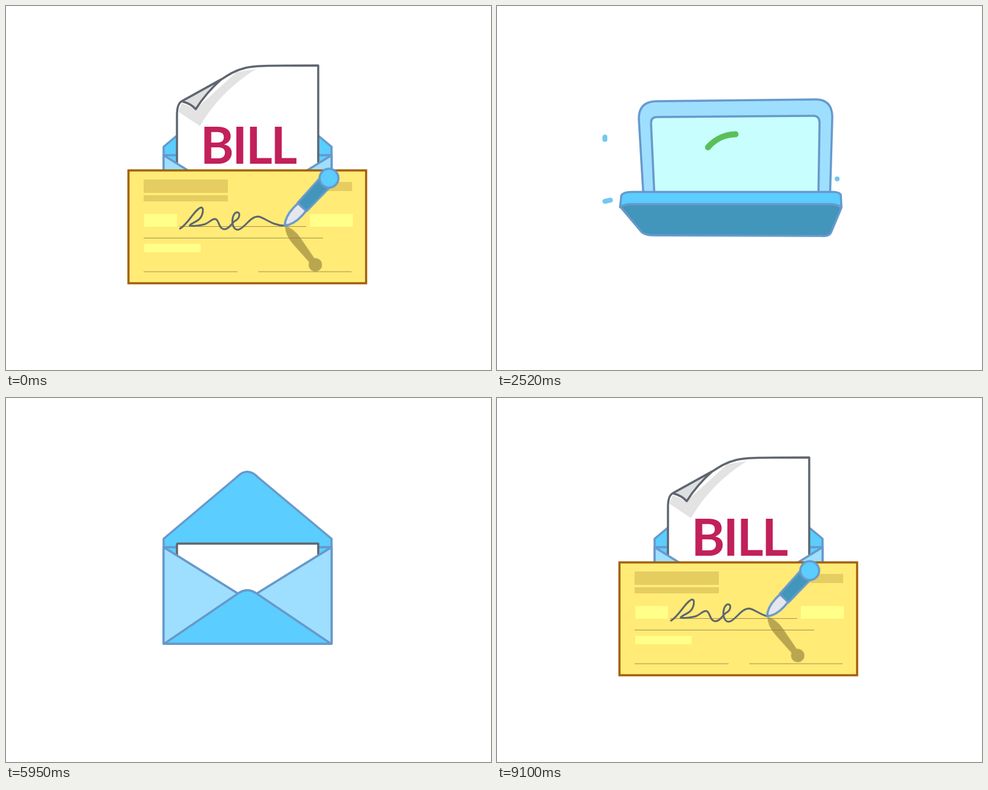
An HTML page without scripts that plays this animation: 800x600 px, repeating every 9.17 s.

```html
<!DOCTYPE html>
<html lang="en">
<head>
<meta charset="utf-8">
<title>Paying a bill by mail</title>
<style>
html, body { margin: 0; width: 100%; height: 100%; overflow: hidden; background: #fff; }
svg { position: absolute; left: 0; top: 0; width: 800px; height: 600px; }
svg * { animation: 9.17s linear infinite; }
.line { stroke: #6799cb; stroke-width: 3.5; stroke-linejoin: round; stroke-linecap: round; }
.sky { fill: #5bcdff; }
.pale { fill: #9edfff; }
.deep { fill: #4295bb; }

/* envelope */
#mail { transform-origin: 398px 325px; animation: turn 9.17s linear infinite; }
@keyframes turn {
  0%, 22.14%, 54.96%, to { transform: perspective(1400px) translate(0, 0) rotateX(0) rotateY(0) scale(1); }
  22.14% { animation-timing-function: ease-in; }
  25.19% { transform: perspective(1400px) translate(0, 0) rotateX(90deg) rotateY(0) scale(1.1); }
  48.09% { transform: perspective(1400px) translate(0, 0) rotateX(90deg) rotateY(18deg) scale(1.1); animation-timing-function: ease-out; }
  51.15% { transform: perspective(1400px) translate(-3px, -1px) rotateX(0) rotateY(18deg) scale(1.04); }
}
.flap { transform-origin: 398px 246px; }
#open { animation-name: open; }
#shut { animation-name: shut; }
@keyframes open {
  0%, 18.3%, 64.89%, to { transform: scaleY(1); }
  20%, 63.2% { transform: scaleY(0); }
}
@keyframes shut {
  0%, 20%, 63.2%, to { transform: scaleY(0); }
  21.37%, 61.83% { transform: scaleY(1); }
}
#cover { animation-name: cover; }
@keyframes cover {
  0%, 11.1%, 72.2%, to { visibility: hidden; }
  11.11%, 72.19% { visibility: visible; }
}

/* bill */
#bill { animation-name: bill; }
@keyframes bill {
  0%, 12.4% { transform: translateY(0); }
  13.5% { transform: translateY(-14px); animation-timing-function: ease-in; }
  15.27% { transform: translateY(50px); }
  17.56% { transform: translateY(170px); }
  64.5% { transform: translateY(170px); animation-timing-function: ease-out; }
  68.7% { transform: translateY(-14px); animation-timing-function: ease-in-out; }
  70.23%, to { transform: translateY(0); }
}
.curl { animation-name: curl; d: var(--a); }
@keyframes curl {
  0%, 11.4%, 72.5%, to { d: var(--a); }
  13%, 70.23% { d: var(--b); }
}
.ink { stroke: #5f666f; stroke-width: 3.5; stroke-linejoin: round; }
#sheet {
  --a: path("M515 98 C440 98 410 98 395 102 C375 107 365 115 355 121 L290 157 C284 160 282 168 282 180 L282 410 L515 410 Z");
  --b: path("M515 148 C440 148 400 148 380 148 C360 148 340 148 330 148 L284 148 C282 148 282 148 282 150 L282 410 L515 410 Z");
  --b: path("M515 98 C440 98 400 98 380 98 C360 98 340 98 330 98 L284 98 C282 98 282 98 282 100 L282 410 L515 410 Z");
}
#shade {
  --a: path("M284 174 L320 198 Q352 142 412 104 L380 109 L313 170 L290 160 Z");
  --b: path("M283 99 L283 99 Q283 99 283 99 L283 99 L283 99 L283 99 Z");
}
#fold {
  --a: path("M290 157 Q305 161 313 170 Q330 143 355 121 Z");
  --b: path("M282 98 Q282 98 282 98 Q282 98 282 98 Z");
}
#word { font: 700 84px Lato, "Open Sans", sans-serif; letter-spacing: -2.5px; fill: #c2205a; }

/* cheque */
#cheque { transform-origin: 398px 271px; animation-name: cheque; }
@keyframes cheque {
  0%, 3.82% { transform: translateY(0) scale(1); animation-timing-function: ease-in-out; }
  10.69% { transform: translateY(-165px) scale(.52); }
  12.98% { transform: translateY(-150px) scale(.52); animation-timing-function: ease-in; }
  15.27% { transform: translateY(-19px) scale(.52); animation-timing-function: ease-out; }
  17.56%, 22.9% { transform: translateY(29px) scale(.52); }
  22.91% { transform: translateY(340px) scale(1); }
  72.3% { transform: translateY(340px) scale(1); animation-timing-function: cubic-bezier(.25, .46, .45, .94); }
  77.6%, to { transform: translateY(0) scale(1); }
}

/* signature and pen share one path and one pace */
:root {
  --sign: path("M287 367 C300 360 312 334 322 332 C327 333 325 346 318 352 C312 357 304 359 303 362 C308 363 320 362 327 360 C335 358 338 351 345 351 C352 352 350 367 360 368 C368 368 372 358 378 354 C386 350 387 340 381 340 C375 341 372 352 374 360 C376 368 381 371 387 367 C397 361 404 347 416 347 C426 348 438 362 460 362 C469 362 477 360 483 357");
}
#sign { d: var(--sign); fill: none; stroke: #5f666f; stroke-width: 3; stroke-linecap: round; stroke-linejoin: round; stroke-dasharray: 100 200; }
#tip { offset-path: var(--sign); offset-rotate: 0deg; }
#sign, #tip { animation-name: write; }
@keyframes write {
  0% { stroke-dashoffset: 6.9; offset-distance: 93.1%; }
  1.2%, 22% { stroke-dashoffset: 0; offset-distance: 100%; }
  22.01%, 82.44% { stroke-dashoffset: 101; offset-distance: 0%; }
  88.55% { stroke-dashoffset: 64; offset-distance: 36%; }
  99.24% { stroke-dashoffset: 11; offset-distance: 89%; }
  to { stroke-dashoffset: 6.9; offset-distance: 93.1%; }
}
#fly { animation-name: fly; }
@keyframes fly {
  0%, 1.2% { transform: translate(0, 0); animation-timing-function: ease-in; }
  4.2%, 22.1% { transform: translate(345px, -240px); }
  22.11%, 78.5% { transform: translate(-345px, 0); animation-timing-function: ease-out; }
  82.44%, to { transform: translate(0, 0); }
}
#pen { animation-name: lean; }
@keyframes lean {
  0%, 99.24%, to { transform: rotate(43deg); }
  1.2%, 25% { transform: rotate(46deg); }
  25.01%, 82.44% { transform: rotate(-58deg); }
  88.55% { transform: rotate(-42deg); }
}
#body { animation-name: reach; }
@keyframes reach {
  0%, 25%, to { transform: scaleY(1); }
  25.01%, 82.44% { transform: scaleY(.9); }
  88.55% { transform: scaleY(.76); }
  99.24% { transform: scaleY(.97); }
}
#cap { animation-name: cap; }
@keyframes cap {
  0%, 25%, to { transform: translateY(-107px); }
  25.01%, 82.44% { transform: translateY(-95px); }
  88.55% { transform: translateY(-81px); }
  99.24% { transform: translateY(-103px); }
}
#cast { fill: #8f7a35; animation-name: cast; }
@keyframes cast {
  0%, 1.2% { transform: rotate(-38deg); opacity: .62; }
  2.6%, 25% { transform: rotate(-38deg); opacity: 0; }
  25.01%, 82.44% { transform: rotate(14deg); opacity: .62; }
  88.55% { transform: rotate(-5deg); opacity: .62; }
  99.24%, to { transform: rotate(-38deg); opacity: .62; }
}

/* laptop */
#laptop { transform-origin: 397px 310px; animation-name: pop; }
@keyframes pop {
  0%, 25.19% { transform: scale(.75, 0); animation-timing-function: ease-out; }
  27.48% { transform: scale(1); }
  30.53% { transform: scale(1.04); animation-timing-function: ease-in-out; }
  33.59%, 43.51% { transform: scale(1); animation-timing-function: ease-in-out; }
  45.5% { transform: scale(1.08, 1); animation-timing-function: ease-in; }
  48.09%, to { transform: scale(.8, 0); }
}
.tilt { animation-name: tilt; d: var(--a); }
@keyframes tilt {
  0%, 27.48% { d: var(--a); animation-timing-function: ease-out; }
  32%, 45% { d: var(--b); }
  48.09%, to { d: var(--a); }
}
#lid {
  --a: path("M242 320 L234 187 Q233 158 262 157 L526 154 Q552 154 553 182 L549 320 Z");
  --b: path("M238 348 L238 172 Q238 147 262 147 L534 147 Q558 147 558 172 L558 348 Z");
}
#screen {
  --a: path("M260 320 L254 193 Q254 183 264 183 L522 181 Q531 181 532 191 L530 320 Z");
  --b: path("M260 332 L260 180 Q260 169 271 169 L525 169 Q536 169 536 180 L536 332 Z");
}
#under {
  --a: path("M203 330 Q210 326 222 326 L548 326 Q560 326 568 332 L551 373 Q548 380 536 379 L258 378 Q246 378 239 373 Z");
  --b: path("M230 452 Q236 450 240 450 L550 450 Q560 450 566 452 L556 400 Q550 396 540 396 L258 396 Q248 396 242 400 Z");
}
#deck {
  --a: path("M212 312 L560 312 L560 320 L212 320 Z");
  --b: path("M238 346 L558 346 L581 442 L215 442 Z");
}
#front {
  --a: path("M205 312 Q208 306 222 306 L556 306 Q567 307 567 312 L568 331 Q560 326 548 326 L222 326 Q210 326 203 331 Z");
  --b: path("M214 440 Q216 436 226 436 L570 436 Q580 436 582 440 L582 452 Q578 459 566 459 L230 459 Q216 459 214 452 Z");
}
#tick { fill: none; stroke: #5abf5a; stroke-width: 10; stroke-linecap: round; stroke-linejoin: round; animation-name: settle; }
#tick path { stroke-dasharray: 100 200; }
@keyframes settle {
  0%, 27.48% { transform: translate(391px, 276px); animation-timing-function: ease-out; }
  32%, to { transform: translate(398px, 250px); }
}
#ring { animation-name: ring; }
@keyframes ring {
  0%, 26.9% { stroke-dashoffset: 103; }
  27.48% { stroke-dashoffset: 87.5; }
  30.53%, 49% { stroke-dashoffset: 0; }
  50%, to { stroke-dashoffset: 103; }
}
#mark { animation-name: mark; }
@keyframes mark {
  0%, 30% { stroke-dashoffset: 110; }
  32%, 49% { stroke-dashoffset: 0; }
  50%, to { stroke-dashoffset: 110; }
}
.spark { fill: none; stroke: #72c8f0; stroke-width: 8; stroke-linecap: round; animation-name: spark; }
@keyframes spark {
  0%, 26% { transform: translate(var(--x), var(--y)); opacity: 0; }
  26.01% { transform: translate(var(--x), var(--y)); opacity: 1; animation-timing-function: ease-out; }
  27.48%, 28.6% { transform: translate(0, 0); opacity: 1; }
  28.61%, to { transform: translate(0, 0); opacity: 0; }
}
</style>
</head>
<body>
<svg id="mail" viewBox="0 0 800 600">
  <defs>
    <clipPath id="inside"><path d="M0 0H800V403H0Z"/></clipPath>
    <g id="pocket" class="line">
      <path class="pale" d="M260 246L398 332L537 246V405H260Z"/>
      <path class="sky" d="M261 405L383 322Q398 312 413 322L536 405Z"/>
    </g>
  </defs>

  <path id="open" class="flap sky line" d="M260 246V232L380 131Q398 112 416 131L537 232V246Z"/>
  <path class="sky line" d="M260 246H537V405H260Z"/>

  <g clip-path="url(#inside)">
    <g id="bill">
      <path id="sheet" class="curl ink" fill="#fff"/>
      <path id="shade" class="curl" fill="#e4e3e3"/>
      <path id="fold" class="curl ink" fill="#dddfe0"/>
      <text id="word" x="320.5" y="260">BILL</text>
    </g>
  </g>

  <use href="#pocket"/>

  <g id="cheque">
    <path d="M202 271H594V457H202Z" fill="#ffeb76" stroke="#a2600c" stroke-width="3.5"/>
    <path d="M227 286h139v22h-139zM227 312h139v10h-139zM517 290h54v15h-54z" fill="#e5cd62"/>
    <path d="M228 343h54v21h-54zM501 343h71v21h-71zM228 392h93v14h-93z" fill="#ffff89"/>
    <path d="M286 363.5H495M227 382.5H523M227 438H382M416 438H570" stroke="#a58d50" stroke-width="1.2"/>
    <path id="sign" pathLength="100"/>
  </g>

  <g id="cover"><use href="#pocket"/></g>
  <path id="shut" class="flap sky line" d="M260 246L378 341Q398 373 419 341L537 246Z"/>

  <g id="fly">
    <g id="tip">
      <g id="cast">
        <path d="M0 1Q9 12 8 32L5 78H-5L-8 32Q-9 12 0 1Z"/>
        <circle cy="82" r="11"/>
      </g>
      <g id="pen" class="line">
        <g id="body">
          <path fill="#e6e6ee" d="M0 0Q-12 -14 -9 -42H9Q12 -14 0 0Z"/>
          <path class="deep" d="M-10 -42L-11 -95H11L10 -42Z"/>
        </g>
        <circle id="cap" class="sky" r="15.5"/>
      </g>
    </g>
  </g>
</svg>

<svg viewBox="0 0 800 600">
  <g id="laptop">
    <g class="line">
      <path id="lid" class="tilt pale"/>
      <path id="screen" class="tilt" fill="#c9feff"/>
    </g>
    <g id="tick">
      <path id="ring" pathLength="100" d="M-43 -43a61 61 0 1 1 86 86a61 61 0 1 1 -86 -86"/>
      <path id="mark" pathLength="100" d="M-28 2L-8 22L30 -20"/>
    </g>
    <g class="line">
      <path id="under" class="tilt deep"/>
      <path id="deck" class="tilt pale"/>
      <path id="front" class="tilt sky"/>
    </g>
  </g>
  <path class="spark" style="--x:50px;--y:20px" d="M178 216V220"/>
  <path class="spark" style="--x:50px;--y:-10px" d="M178 322L187 320"/>
  <path class="spark" style="--x:-40px;--y:5px" d="M561 285h.1"/>
</svg>
</body>
</html>
```
